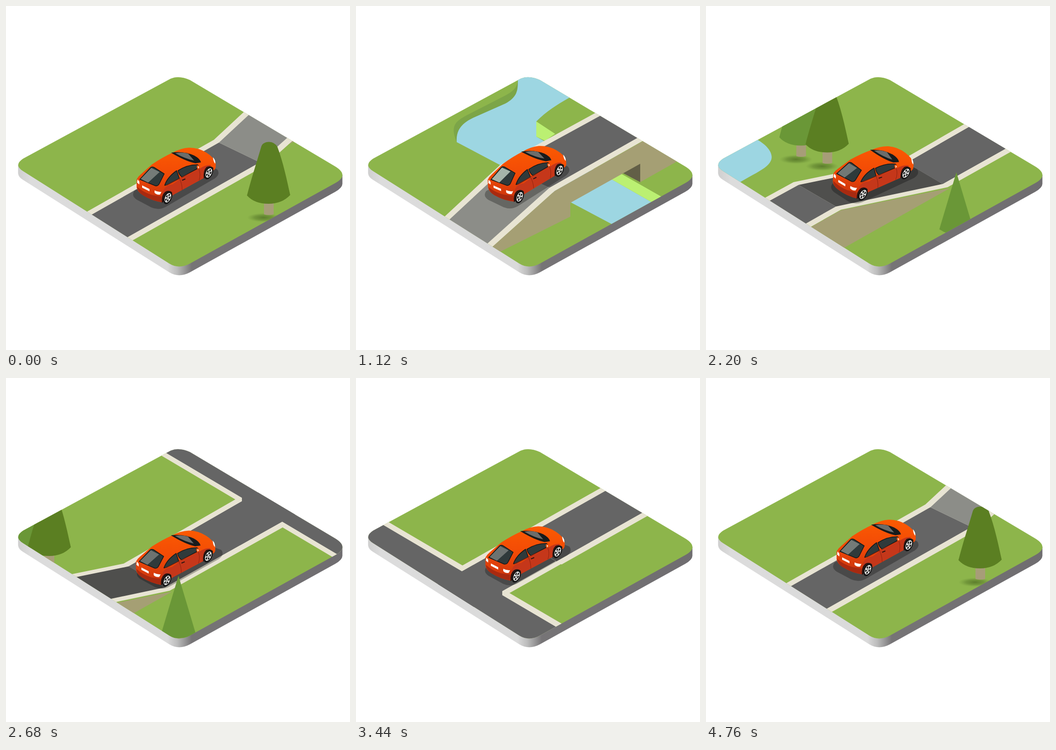
Animation, 748 px wide and 748 px high, one loop 4.8 s. Source, as an HTML page:

```html
<!DOCTYPE html>
<html lang="en">
<head>
<meta charset="utf-8">
<title>Isometric drive</title>
<style>
html, body { margin: 0; width: 100%; height: 100%; overflow: hidden; background: #fff; }
svg { display: block; width: 100vw; height: 100vh; }
.dark { fill: #5b7f22; }
.light { fill: #6a9737; }
.glass { fill: #2f3a3b; stroke: #16191a; stroke-width: 1.6; stroke-linejoin: round; }
.seam { fill: none; stroke: #8e2410; stroke-width: 1; }
</style>
</head>
<body>
<svg viewBox="0 0 748 748">
  <defs>
    <path id="tile" d="M358 158Q376 150 400 161L716 349Q747 368 716 385L400 560Q376 573 355 560L37 359Q16 346 37 332Z"/>
    <clipPath id="clip"><use href="#tile"/></clipPath>
    <linearGradient id="rim" gradientUnits="userSpaceOnUse" x1="26" y1="0" x2="732" y2="0">
      <stop offset="0" stop-color="#cfcfcf"/>
      <stop offset=".04" stop-color="#dcdcdc"/>
      <stop offset=".46" stop-color="#dadada"/>
      <stop offset=".49" stop-color="#bdbdbd"/>
      <stop offset=".535" stop-color="#767476"/>
      <stop offset="1" stop-color="#6f6d70"/>
    </linearGradient>
    <radialGradient id="shade">
      <stop offset="0" stop-color="#4c6a22" stop-opacity=".75"/>
      <stop offset=".55" stop-color="#587a2a" stop-opacity=".5"/>
      <stop offset="1" stop-color="#6a9037" stop-opacity="0"/>
    </radialGradient>
    <linearGradient id="paint" x1="0" y1="0" x2="0" y2="1">
      <stop offset="0" stop-color="#fb5a02"/>
      <stop offset=".5" stop-color="#f24a06"/>
      <stop offset="1" stop-color="#c5310f"/>
    </linearGradient>
    <g id="trunk">
      <ellipse cx="-11" cy="6" rx="36" ry="10" fill="url(#shade)"/>
      <path d="M-10-32H11V-1Q0 2-10-1Z" fill="#a79d78"/>
    </g>
    <g id="tree">
      <use href="#trunk"/>
      <path d="M-47-42C-39-74-26-114-16-148Q-13-158 1-158.5Q13-158 19-148C32-114 40-74 47-43Q29-24 0-24Q-31-24-47-42Z"/>
    </g>
    <g id="cone">
      <use href="#trunk"/>
      <path d="M0-158L37-34Q20-22 0-22Q-20-22-37-34Z"/>
    </g>
    <g id="wheel">
      <circle r="12.5" fill="#161616"/>
      <circle r="9.2" fill="#f0f0ee"/>
      <circle class="spokes" r="5.4" fill="none" stroke="#1d1d1d" stroke-width="4.6" pathLength="5" stroke-dasharray=".62 .38"/>
      <circle r="1.5" fill="#555"/>
    </g>
  </defs>

  <path fill="url(#rim)" d="M26.3 345V364Q27 372 37 378L355 579Q376 592 400 579L716 404Q732 395 731.5 386V367Z"/>
  <use href="#tile" fill="#8db54b"/>

  <g clip-path="url(#clip)"><g class="pan">
    <g id="land">
      <g transform="translate(366 -266)">
        <path fill="#7ca548" d="M219 296C205 262 214 252 240 238L320 197C342 186 350 178 352 162V200L300 260Z"/>
        <path fill="#9dd6e2" d="M219 296C217 268 232 254 255 243L325 212C350 198 352 185 352 162V60H463V103C505 118 530 145 515 165C500 187 440 203 392 251V284L556 377L856 548L867 639L467 427Z"/>
        <path fill="#bbf072" d="M392 251L433 278L411 293L392 284ZM556 377L577 365L877 536L856 548Z"/>
        <path fill="#625f47" d="M570 369L618 340V383L580 363Z"/>
        <path fill="#a59f74" d="M240 571L197 613L432 402L670 268L907 220L618 383V343L466 428V458Z"/>
      </g>
      <g id="road"></g>
      <use href="#tree" class="light" x="949" y="-114.5"/>
      <use href="#tree" class="dark" x="1006" y="-99.5"/>
    </g>
    <use href="#land" transform="translate(1739 -976)"/>
  </g></g>

  <g id="car">
    <path id="shadow" fill="#000" fill-opacity=".28" d="M280 401Q271 412 284 421L316 438Q332 445 347 437L454 375Q467 365 459 355L430 345L300 392Z"/>
    <path fill="url(#paint)" d="M284 377Q287 371 293 366L318 344Q340 329 362 319Q380 309 398 308Q419 308 436 319Q452 329 456 341V350Q455 357 448 358L430 374L365 410L340 427Q318 424 297 411Q285 403 284 394Z"/>
    <path fill="#c5371a" d="M339 426L342 402Q347 389 362 388L378 376L420 354Q436 344 446 346L430 374L364 410Z"/>
    <path fill="#a82a10" d="M285 393Q298 405 318 411L338 414V426Q318 424 297 411Q286 404 285 393Z"/>
    <path class="glass" d="M291 377L315 351Q318 349 322 351L344 365L334 385Q331 392 325 391Z"/>
    <path fill="#6d7371" d="M293 376L316 352L334 361L309 384Z"/>
    <path id="glare" fill="#afc0b4" d="M293 376L316 352L334 361L309 384Z"/>
    <path fill="#181b1c" d="M359 319Q386 315 409 325Q422 332 424 340L412 342Q391 338 359 319Z"/>
    <path fill="#6c6d6b" d="M368 320Q384 317 396 321L409 336Q389 332 368 320Z"/>
    <path class="glass" d="M345 390Q351 372 371 358L377 375L350 389Z"/>
    <path class="glass" d="M374 358Q394 345 416 345Q422 348 417 353L383 372Q376 367 374 358Z"/>
    <path class="seam" d="M377 375Q383 386 383 400M419 354Q424 364 420 379M346 391L377 375L420 353"/>
    <path stroke="#241411" stroke-width="2" d="M383 379L390 376"/>
    <path fill="#fff" d="M296 390L312 398V403L296 395ZM323 401Q331 405 338 404L335 410Q327 411 323 406ZM286 377L290 382V388L285 384ZM450 329Q456 335 455 343Q451 339 450 329Z"/>
    <path fill="#f45208" d="M415 347Q420 345 421 350L418 355Q414 353 415 347Z"/>
    <path fill="#f3eee9" d="M417 348L420 350L418 354Z"/>
    <path fill="#2a1310" d="M339 428Q337 412 346 404Q354 399 361 405V414ZM430 375Q428 358 436 350Q444 346 451 352L449 362Z"/>
    <use href="#wheel" transform="matrix(.78 -.47 0 1 352 417)"/>
    <use href="#wheel" transform="matrix(.78 -.47 0 1 441 363)"/>
  </g>

  <g clip-path="url(#clip)"><g class="pan">
    <g id="front">
      <use href="#tree" class="dark" x="571" y="454"/>
      <use href="#cone" class="light" x="1287" y="77.5"/>
    </g>
    <use href="#front" transform="translate(1739 -976)"/>
  </g></g>
</svg>
<script>
const LOOP = 4800, STEP = 40;
const $ = s => document.querySelector(s);

// Inner edges of the curbs, one pair of points per bend.
const left = [[-120, 627], [463, 297], [690, 86], [944, -53], [1179, -101], [1433, -247], [1497, -281.5], [1650, -368]];
const right = [[-39, 674], [552, 340], [787, 129], [1025, -6], [1257, -55], [1514, -199], [1578, -235], [1731, -321]];
const FLAT = '#656565', CURB = '#e8e4d3';
const tones = [FLAT, '#8c8d88', FLAT, '#4f4f4d', FLAT, FLAT, FLAT];
const shift = (pts, dx, dy) => pts.map(([x, y]) => [x + dx, y + dy]);
const band = (fill, from, to, out) => {
  const pts = [
    ...shift(left.slice(from, to), -11 * out, -6 * out),
    ...shift(right.slice(from, to), 11 * out, 7 * out).reverse()
  ];
  return `<polygon fill="${fill}" points="${pts.join(' ')}"/>`;
};
const cross = (fill, d) => `<path transform="translate(912 -510.5)" fill="${fill}" d="${d}"/>`;

$('#road').innerHTML =
  band(CURB, 0, 8, 1) +
  cross(CURB, 'M100 28L1100 620V520.6L100-66Z') +
  tones.map((c, i) => band(c, i, i + 2, 0)).join('') +
  band(FLAT, 4, 8, 0) +
  cross(FLAT, 'M100 16L1100 608V535.7L100-54Z') +
  cross(FLAT, 'M513 256L524 264L513 270ZM670 271L659 277L670 283Z');

// time, x, y
const pan = [
  [40, 0, 0], [640, -198, 130], [1120, -366, 266], [1720, -584, 380.5],
  [2680, -912, 510.5], [3440, -1264, 700.5], [4760, -1714, 960]
];
// time, rear wheel x, y, pitch in degrees, window glare, shadow slide
const ride = [
  [40, 352, 417, 0, .1, 0], [640, 364, 408, -5.9, 1, 0], [1120, 356, 415, -2.3, .85, 0],
  [1720, 338, 409, 3.2, .25, 1], [2100, 340, 406, 5, .1, 4], [2400, 345, 422, 4, 0, 8],
  [2680, 350, 440, .9, 0, 10], [3440, 349, 431, .7, 0, 7], [4760, 352, 417, 0, .1, 0]
];

// Smooth cyclic curve through the keys; drift is what one loop adds.
function sample(keys, t, drift) {
  const n = keys.length;
  const at = i => {
    const lap = Math.floor(i / n);
    return keys[i - lap * n].map((v, c) => v + lap * (drift[c] || 0));
  };
  let i = 0;
  while (at(i + 1)[0] <= t) i++;
  const [a, b, c, d] = [i - 1, i, i + 1, i + 2].map(at);
  const span = c[0] - b[0], s = (t - b[0]) / span;
  return b.map((v, k) => {
    const m0 = (c[k] - a[k]) / (c[0] - a[0]) * span;
    const m1 = (d[k] - b[k]) / (d[0] - b[0]) * span;
    const gap = c[k] - v;
    return v + s * (m0 + s * (3 * gap - 2 * m0 - m1 + s * (m0 + m1 - 2 * gap)));
  });
}

const pans = document.querySelectorAll('.pan');
const car = $('#car'), shadow = $('#shadow'), glare = $('#glare'), spokes = $('.spokes');

function draw(time) {
  const t = Math.max(STEP, Math.floor(time % LOOP / STEP) * STEP);
  const [, x, y] = sample(pan, t, [LOOP, -1739, 976]);
  pans.forEach(p => p.setAttribute('transform', `translate(${x} ${y})`));

  const [, rx, ry, pitch, shine, slide] = sample(ride, t, [LOOP]);
  car.setAttribute('transform', `translate(${rx} ${ry}) rotate(${pitch}) translate(-352 -417)`);
  shadow.setAttribute('transform', `translate(${slide} ${-.6 * slide})`);
  glare.setAttribute('opacity', Math.min(1, Math.max(0, shine)));
  spokes.setAttribute('stroke-dashoffset', x / 15 % 5);
}

function tick() {
  draw(performance.now());
  requestAnimationFrame(tick);
}
tick();
</script>
</body>
</html>
```
